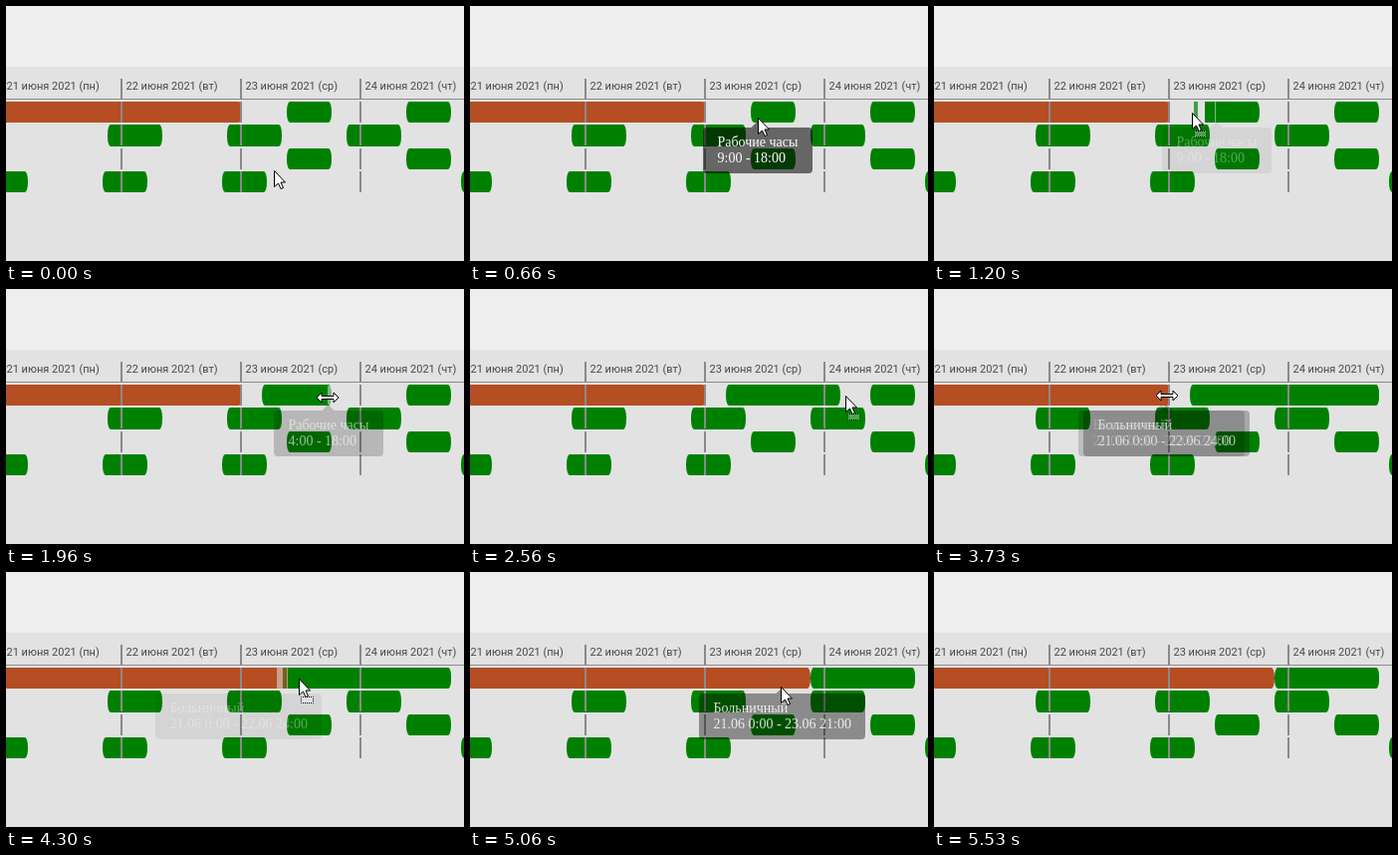
Write an HTML page with a canvas that moves like this. It is 460x256 px and loops after 6200 ms.

```html
<!DOCTYPE html>
<html lang="ru">
<head>
<meta charset="utf-8">
<title>График смен</title>
<style>
html, body { margin: 0; width: 100%; height: 100%; overflow: hidden; background: #e2e2e3; }
canvas { display: block; width: 460px; height: 256px; }
</style>
</head>
<body>
<canvas id="stage" width="460" height="256"></canvas>
<script>
const ctx = document.getElementById('stage').getContext('2d');
const LOOP = 6200, GONE = 5480;
const DAY = 120, HOUR = 5, MIDNIGHT = 237;
const LAG = 50, FADE = 170, HOVER_DELAY = 40, STEP = 10;
const GREEN = '#008000', ORANGE = '#b54e22', GRID = '#8a8a8c';
const PALE = 'rgba(226,226,227,.55)';

// Places where the pointer rests: arrival, departure, x, y
const STOPS = [
  [0, 100, 269, 165],
  [480, 720, 289, 112],
  [760, 1060, 283, 107],
  [1210, 1380, 257, 107],
  [1480, 1700, 304, 104],
  [1740, 1840, 319, 108],
  [1870, 2260, 323, 109],
  [2940, 2950, 445, 105],
  [2980, 3190, 408, 104],
  [3200, 3210, 276, 108],
  [3320, 3600, 229, 108],
  [3620, 4155, 234, 107],
  [4415, 4820, 340, 107],
  [4920, 5330, 312, 115],
  [5440, LOOP, 300, 197]
];
const DRAGS = {
  start: { from: 1060, to: 1380 },
  end: { from: 2260, to: 2950 },
  sick: { from: 4155, to: 4470 }
};

const ARROW = [[0, 0], [0, 16], [4, 12.5], [6.5, 18], [9, 17], [6.5, 11.5], [11, 11.5]];
const RESIZE = [[-11, 0], [-6, -5], [-6, -1.5], [6, -1.5], [6, -5], [11, 0],
  [6, 5], [6, 1.5], [-6, 1.5], [-6, 5]];

const clamp = (v, a, b) => Math.min(b, Math.max(a, v));
const snap = (x, round = Math.floor) => MIDNIGHT + round((x - MIDNIGHT) / HOUR) * HOUR;
const rowTop = row => Math.round(96 + row * 23.4);
const active = (name, t) => t >= DRAGS[name].from && t < DRAGS[name].to;
const dragging = t => Object.keys(DRAGS).some(name => active(name, t));

function pointer(t) {
  const i = STOPS.findIndex(stop => t < stop[1]);
  const [arrive, , x, y] = STOPS[i];
  if (t >= arrive) return [x, y];
  const [, leave, x0, y0] = STOPS[i - 1];
  const k = (t - leave) / (arrive - leave);
  return [x0 + (x - x0) * k, y0 + (y - y0) * k];
}

// Bar edges follow the pointer in whole hours, slightly late
function edges(t) {
  const held = name => pointer(clamp(t - LAG, DRAGS[name].from, DRAGS[name].to - 1))[0];
  return {
    start: clamp(snap(held('start'), Math.ceil), 257, 282),
    end: clamp(snap(held('end')) + HOUR, 327, 447),
    sick: clamp(snap(held('sick')) + HOUR, 237, 342)
  };
}

function hoveredCell(t) {
  const [x, y] = pointer(t);
  return dragging(t) || y > 118 ? null : snap(x);
}

const isHandle = (cell, e) => cell === e.start || cell === e.end - HOUR || cell === e.sick - HOUR;

function formatRange(from, to) {
  const a = Math.floor(from / 24), b = Math.ceil(to / 24) - 1;
  const date = d => a === b ? '' : `${23 + d}.06 `;
  return `${date(a)}${from - a * 24}:00 - ${date(b)}${to - b * 24}:00`;
}

function tipLines(cell, e) {
  const hours = x => (x - MIDNIGHT) / HOUR;
  return cell < e.sick
    ? ['Больничный', formatRange(-48, hours(e.sick))]
    : ['Рабочие часы', formatRange(hours(e.start), hours(e.end))];
}

// Each hour has its own tip that fades in under a resting pointer
function tipsAt(t) {
  const tips = new Map();
  for (let s = HOVER_DELAY; s <= t; s += STEP) {
    const cell = hoveredCell(s);
    const resting = cell !== null && cell === hoveredCell(s - HOVER_DELAY);
    if (resting && !tips.has(cell)) tips.set(cell, { alpha: 0, lines: tipLines(cell, edges(s)) });
    tips.forEach((tip, key) => {
      tip.alpha = Math.min(1, tip.alpha + (resting && key === cell ? STEP : -STEP) / FADE);
      if (tip.alpha <= 0) tips.delete(key);
    });
  }
  return tips;
}

function rect(x, y, w, h, color) {
  ctx.fillStyle = color;
  ctx.fillRect(x, y, w, h);
}

function bar(row, left, right, color, roundLeft = true, roundRight = true) {
  const l = roundLeft ? { x: 3, y: 10 } : 0, r = roundRight ? { x: 3, y: 10 } : 0;
  ctx.fillStyle = color;
  ctx.beginPath();
  ctx.roundRect(left, rowTop(row), right - left, row === 1 ? 22 : 21, [l, r, r, l]);
  ctx.fill();
}

function shape(points, x, y) {
  ctx.beginPath();
  points.forEach(([px, py]) => ctx.lineTo(x + px, y + py));
  ctx.closePath();
  ctx.fillStyle = '#fff';
  ctx.strokeStyle = '#000';
  ctx.fill();
  ctx.stroke();
}

function drawHeader() {
  rect(0, 0, 460, 256, '#e2e2e3');
  rect(0, 0, 460, 61, '#eeeeee');
  rect(0, 93, 460, 1, GRID);
  ctx.font = '11px Roboto, sans-serif';
  ctx.fillStyle = '#484848';
  ['пн', 'вт', 'ср', 'чт'].forEach((name, i) =>
    ctx.fillText(`${21 + i} июня 2021 (${name})`, 0.5 + i * DAY, 84));
}

function drawGrid() {
  for (let x = 115; x < 460; x += DAY) {
    rect(x, 73, 2, 20, GRID);
    for (let row = 0; row < 4; row++) rect(x, rowTop(row), 2, 21, GRID);
  }
}

function drawBars(t) {
  const e = edges(t), cell = hoveredCell(t);
  const cutWork = active('start', t) && e.start > 257;
  const cutSick = active('sick', t) && e.sick < 342;

  bar(0, 402, 447, GREEN);
  bar(0, Math.max(e.start, e.sick), e.end, GREEN, !cutWork && !cutSick);
  bar(0, -10, e.sick, ORANGE, false, !cutSick);

  if (cutSick && e.sick > MIDNIGHT) {
    rect(e.sick - HOUR, 96, HOUR, 21, PALE);
    rect(e.sick, 96, HOUR, 21, 'rgba(181,78,34,.7)');
    [0, HOUR].forEach(dx => rect(e.sick + dx, 96, 1, 21, PALE));
  }
  if (cutWork && e.start < 282) {
    rect(snap(pointer(t)[0]) + 4, 96, 4, 21, 'rgba(0,128,0,.7)');
    rect(282, 96, 1, 21, PALE);
  }
  if (cell === e.end - HOUR) rect(cell + 1, 97, 4, 19, PALE);

  for (let day = 1; day < 4; day++) bar(1, day * DAY - 18, day * DAY + 37, GREEN);
  [282, 402].forEach(x => bar(2, x, x + 45, GREEN));
  [0, 1, 2, 4].forEach(day => bar(3, day * DAY - 23, day * DAY + 22, GREEN));
}

function drawTip({ alpha, lines }, cell) {
  const cx = cell + 1.5;
  ctx.font = '14px "Liberation Serif", serif';
  const w = Math.round(Math.max(...lines.map(s => ctx.measureText(s).width)) + 29);
  const x = Math.round(cx - w / 2);
  ctx.globalAlpha = alpha;
  ctx.fillStyle = 'rgba(0,0,0,.55)';
  ctx.beginPath();
  ctx.roundRect(x, 122, w, 46, 4);
  ctx.moveTo(cx - 6, 122);
  ctx.lineTo(cx, 116);
  ctx.lineTo(cx + 6, 122);
  ctx.fill();
  ctx.globalAlpha = Math.sqrt(alpha);
  ctx.fillStyle = '#fff';
  lines.forEach((s, i) => ctx.fillText(s, x + 14.5, 141 + i * 16));
  ctx.globalAlpha = 1;
}

function drawPointer(t) {
  if (t >= GONE) return;
  const [x, y] = pointer(t).map(Math.round);
  ctx.lineWidth = 1;
  if (isHandle(hoveredCell(t), edges(t))) return shape(RESIZE, x, y);
  shape(ARROW, x + 0.5, y + 0.5);
  if (dragging(t)) {
    rect(x + 2, y + 18, 13, 7, 'rgba(255,255,255,.3)');
    ctx.setLineDash([1, 1]);
    ctx.lineDashOffset = 0.5;
    ctx.strokeRect(x + 2.5, y + 18.5, 12, 6);
    ctx.setLineDash([]);
  }
}

function render(t) {
  drawHeader();
  drawBars(t);
  drawGrid();
  tipsAt(t).forEach(drawTip);
  drawPointer(t);
}

const began = performance.now();
function tick() {
  render((performance.now() - began) % LOOP);
  requestAnimationFrame(tick);
}
tick();
</script>
</body>
</html>
```
